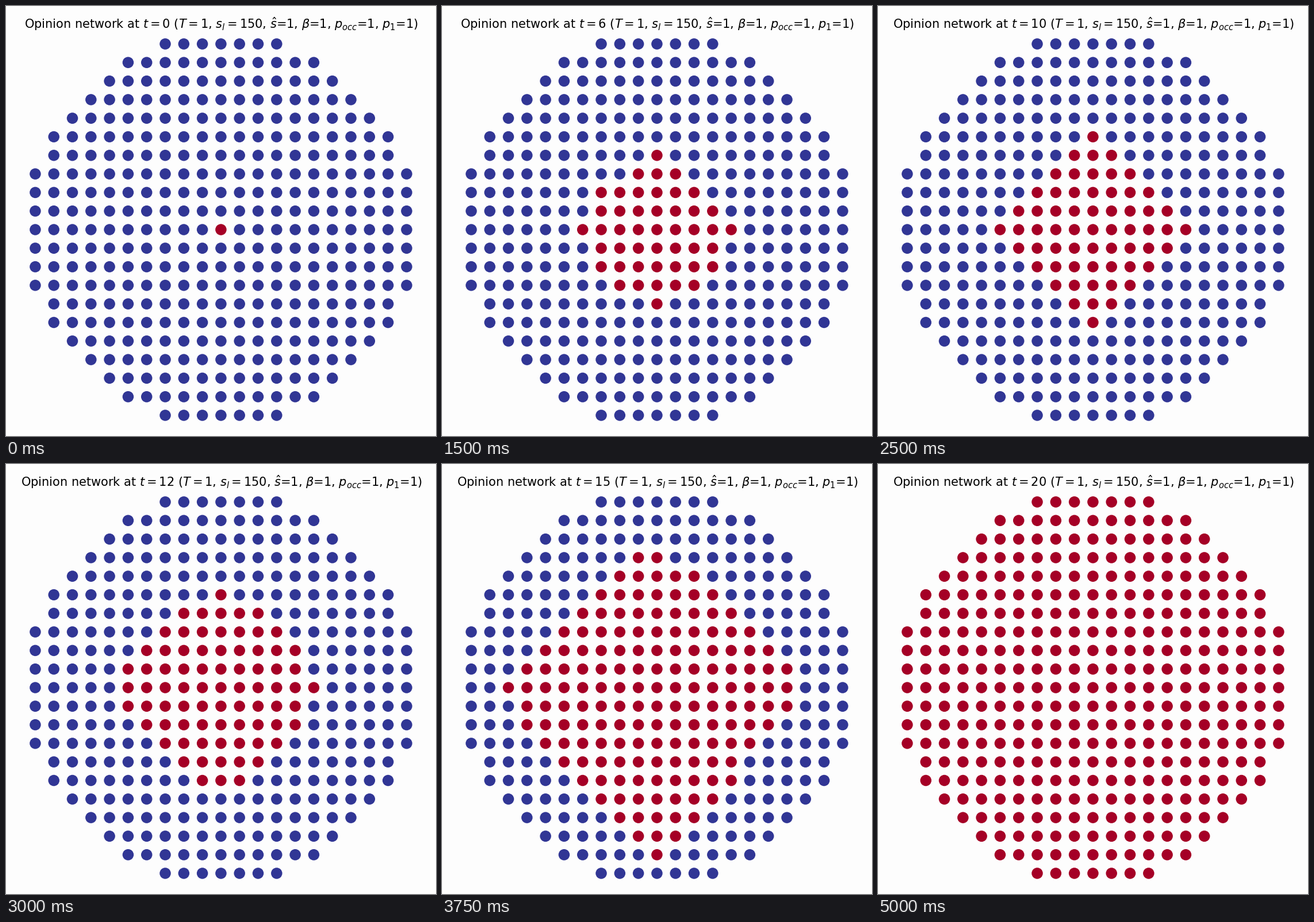
Animation, 748 px wide and 748 px high, one loop 5.25 s. Source, as a matplotlib script:

```python
import numpy as np
import matplotlib.pyplot as plt
from matplotlib.animation import FuncAnimation

SIZE, DPI = 748, 100
CX, CY, PITCH, RADIUS = 373.9, 389, 32.3, 9.75
STEPS, STEP_MS = 21, 250

# How far the cluster reaches at a few key steps
KEY_STEPS = [0, 4, 6, 10, 12, 15]
KEY_REACH = [0, 5.3, 6.095, 6.9, 7.53, 10.62]


def switch_steps(x, y):
    """Step at which each node at grid offset (x, y) changes opinion."""
    dist = abs(x) + abs(y)
    # Diamond front, slower at its tips and leaning down-left as it grows
    lean = 0.12 * np.minimum(dist / 9, 1) ** 4
    cost = dist + 0.3 * np.hypot(x, y) + lean * (0.5 * x - y)
    front = np.ceil(np.interp(cost, KEY_REACH, KEY_STEPS))

    # Then the rest flips at once, the upper rim one step later
    rim = (y < -3) & (dist > 10.5 + np.maximum(-x, 0) / 4)
    rest = np.where(rim | (y < -8), 17, 16)
    return np.where(cost <= KEY_REACH[-1], front, rest)


def title(t):
    return (rf"Opinion network at $t={t}$ ($T=1$, $s_l=150$, $\hat{{s}}$=1, "
            r"$\beta$=1, $p_{occ}$=1, $p_1$=1)")


x, y = np.meshgrid(np.arange(-10, 11), np.arange(-10, 11))
inside = x**2 + y**2 <= 110
x, y = x[inside], y[inside]
switch = switch_steps(x, y)

plt.rcParams["font.family"] = "DejaVu Sans"
fig = plt.figure(figsize=(SIZE / DPI, SIZE / DPI), dpi=DPI, facecolor="#fdfdfd")
ax = fig.add_axes([0, 0, 1, 1])
ax.set(xlim=(0, SIZE), ylim=(SIZE, 0))
ax.axis("off")

dots = ax.scatter(CX + PITCH * x, CY + PITCH * y,
                  s=(2 * RADIUS * 72 / DPI) ** 2, c=np.zeros(len(x)),
                  cmap="RdYlBu_r", vmin=0, vmax=1, linewidths=0)
label = ax.text(374.8, 39, title(0), size=15, color="black",
                ha="center", va="baseline")


def draw(t):
    dots.set_array((switch <= t).astype(float))
    label.set_text(title(t))
    return dots, label


anim = FuncAnimation(fig, draw, frames=STEPS, interval=STEP_MS,
                     init_func=lambda: draw(0), repeat=True, repeat_delay=0)
plt.show()
```
